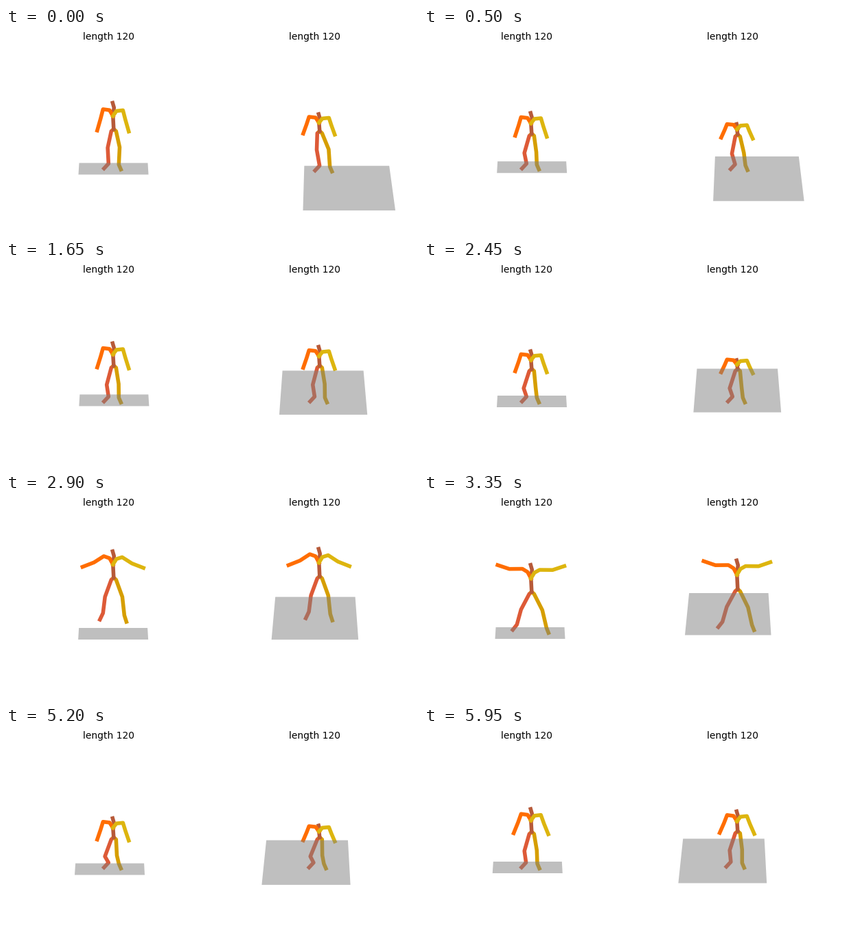
A matplotlib script that plays this animation: 600 px wide and 300 px high, repeating every 6000 ms.

```python
import numpy as np
import matplotlib.pyplot as plt
from matplotlib.animation import FuncAnimation
from matplotlib.patches import Polygon

FRAMES, STEP = 120, 50
W, H = 600, 300

# right leg, left leg, spine, right arm, left arm
COLORS = ["#DD5A37", "#D69E00", "#B75A39", "#FF6D00", "#DDB50E"]

# postures: hip height over the sole, trunk height, arm and leg spread
READY = 59, 38.5, 0
STAND = 56.5, 36.7, 0
DIP = 52, 30, 0
SQUAT = 49, 26, 0
DEEP = 45.5, 28, 0
STRETCH = 66, 38, 0
APEX = 62, 39, 1.3
STAR = 60, 39.5, 1
LAND = 53.5, 33.5, 0.05

GRAVITY = 0.00036  # px per ms squared, halved
HOPS = (1025, 17), (3075, 31), (5600, 32)  # apex time, height


def track(keys):
    """Monotone cubic curve through {time: values}."""
    t = np.array(list(keys), float)
    v = np.array([np.atleast_1d(x) for x in keys.values()], float)
    d = np.diff(v, axis=0) / np.diff(t)[:, None]
    a, b = d[:-1], d[1:]
    same = a * b > 0
    mean = np.where(same, 2 * a * b / np.where(same, a + b, 1), 0)
    m = np.vstack([d[:1], mean, d[-1:]])

    def at(x):
        i = int(np.clip(np.searchsorted(t, x, side="right") - 1, 0, len(t) - 2))
        w = t[i + 1] - t[i]
        s = (x - t[i]) / w
        return ((1 + 2 * s) * (1 - s) ** 2 * v[i] + s * (1 - s) ** 2 * w * m[i]
                + s * s * (3 - 2 * s) * v[i + 1] + s * s * (s - 1) * w * m[i + 1])

    return at


posture = track({
    0: READY, 250: STAND, 550: DIP, 800: STRETCH, 1175: STRETCH, 1450: DIP,
    1900: STAND, 2050: STAND, 2450: SQUAT, 2750: STRETCH, 3075: APEX, 3350: STAR,
    3600: DIP, 3950: STAND, 4300: STAND, 4800: STAND, 5200: DEEP, 5400: STRETCH,
    5800: STRETCH, 5950: LAND})


def hop(t):
    return max(0, *(h - GRAVITY * (t - apex) ** 2 for apex, h in HOPS))


def arm(chest, side, lift, star, scale):
    """Collar, shoulder, elbow and wrist; the arm swings out with star."""
    spread = min(star, 1)
    collar = chest + [side * 5, -lift * (0.87 - 0.2 * spread)]
    shoulder = chest + [side * (14.5 - 2 * spread), -lift]
    pts = [chest, collar, shoulder]
    for hang, swing, length, reach in ((14.5, 75, 14, 5), (16, 92, 18, 0)):
        angle = np.radians(hang + swing * star)
        size = length + reach * spread
        pts.append(pts[-1] + size * np.array([side * np.sin(angle), scale * np.cos(angle)]))
    return np.array(pts)


def leg(root, side, toe_y, star, bend, point, sway):
    """Hip, knee, ankle and toe; both knees give way to the same side."""
    right = side < 0
    spread = min(star, 1)
    ankle = np.array([root[0] + side * (7.5 + 14 * spread) + sway, toe_y - 7 - 2.5 * point])
    toe = np.array([ankle[0] + (-6.5 + 2 * point if right else 3), toe_y])
    frac = 0.54 + 0.85 * bend if right else 0.51 + 0.7 * bend
    knee = np.array([root[0] + side * (8.7 + 6.8 * spread) - 16 * bend + 0.6 * sway,
                     root[1] + frac * (ankle[1] - root[1])])
    return np.array([root, root + [side * 3.5, 3], knee, ankle, toe])


def skeleton(x, ground, hip, trunk, star, up, sway):
    sole = ground - up
    root = np.array([x, sole - hip])
    chest = root + [-1, -0.5 * trunk]
    head = root + [-1.5, -trunk]
    lift = 0.1 * trunk + 6 + 4 * min(star, 1)
    scale = 0.4 + 0.6 * trunk / 38
    bend = max(0, 1 - (hip - 7) / 51.5)
    point = min(1, up / 15)
    return [leg(root, -1, sole - 1.5 - 3 * star, star, bend, point, sway),
            leg(root, 1, sole, star, bend, point, sway),
            np.array([root, chest, head + [2, 7], head]),
            arm(chest, -1, lift, star, scale),
            arm(chest, 1, lift - 1.5, star, scale)]


def front_view(t):
    cx, near = front_floor(t)
    hip, trunk, star = posture(t)
    body = skeleton(156.8, 207, hip, trunk, star, hop(t), 0)
    return body, floor_quad(cx, near, 51, 17, 156, 0.98)


def high_view(t):
    """Seen from above: leaning forward shortens the trunk much more."""
    cx, near = high_floor(t)
    hip, trunk, star = posture(t)
    trunk = 13 + 2.15 * (trunk - 26) - 0.55 * max(0, near - 240)
    off = cx - 456
    body = skeleton(456.8, high_ground(t)[0], hip, trunk, star, hop(t), off * abs(off) / 260)
    depth = min(65.3, 61.5 + 0.16 * (near - 206.5))
    return body, floor_quad(cx, near, 62.75 + 0.0745 * (near - 206.5), depth, 456, 0.92)


def floor_quad(cx, near, half, depth, mid, ratio):
    x = np.array([cx - half, cx + half])
    far = mid + (x - mid) * ratio
    return [(x[0], near), (x[1], near), (far[1], near - depth), (far[0], near - depth)]


# centre x and y of the floor's near edge
front_floor = track({
    0: (156.5, 214.5), 950: (157.5, 211), 2450: (157, 214), 3350: (154.5, 212),
    4300: (147.5, 217.5), 5200: (151, 216.5), 5950: (150.75, 214)})
high_floor = track({
    0: (499.75, 267), 950: (475.75, 240), 1300: (465.5, 227), 2450: (456.25, 221.5),
    3350: (442.75, 206.5), 4300: (430.25, 227), 5200: (437, 231), 5950: (434.75, 228.5)})
high_ground = track({0: 210, 950: 207, 2450: 207, 3350: 203, 4300: 203, 5200: 207, 5950: 206})

fig = plt.figure(figsize=(W / 100, H / 100), dpi=100, facecolor="white")
ax = fig.add_axes([0, 0, 1, 1])
ax.set(xlim=(0, W), ylim=(H, 0))
ax.axis("off")


class Panel:
    def __init__(self, view, title_x):
        self.view = view
        self.lines = [ax.plot([], [], color=c, lw=4, solid_joinstyle="round")[0] for c in COLORS]
        self.floor = ax.add_patch(Polygon([(0, 0)] * 3, fc=(0.5, 0.5, 0.5, 0.5), ec="none", zorder=5))
        fig.text(title_x, 0.98, "length 120", ha="center", va="top",
                 fontsize=10, family="DejaVu Sans")

    def draw(self, t):
        body, quad = self.view(t)
        for line, pts in zip(self.lines, body):
            line.set_data(pts[:, 0], pts[:, 1])
        self.floor.set_xy(quad)
        return [*self.lines, self.floor]


panels = [Panel(front_view, 0.25), Panel(high_view, 0.75)]


def update(i):
    return [artist for panel in panels for artist in panel.draw(i * STEP)]


anim = FuncAnimation(fig, update, frames=FRAMES, interval=STEP, repeat=True, repeat_delay=0)
plt.show()
```
